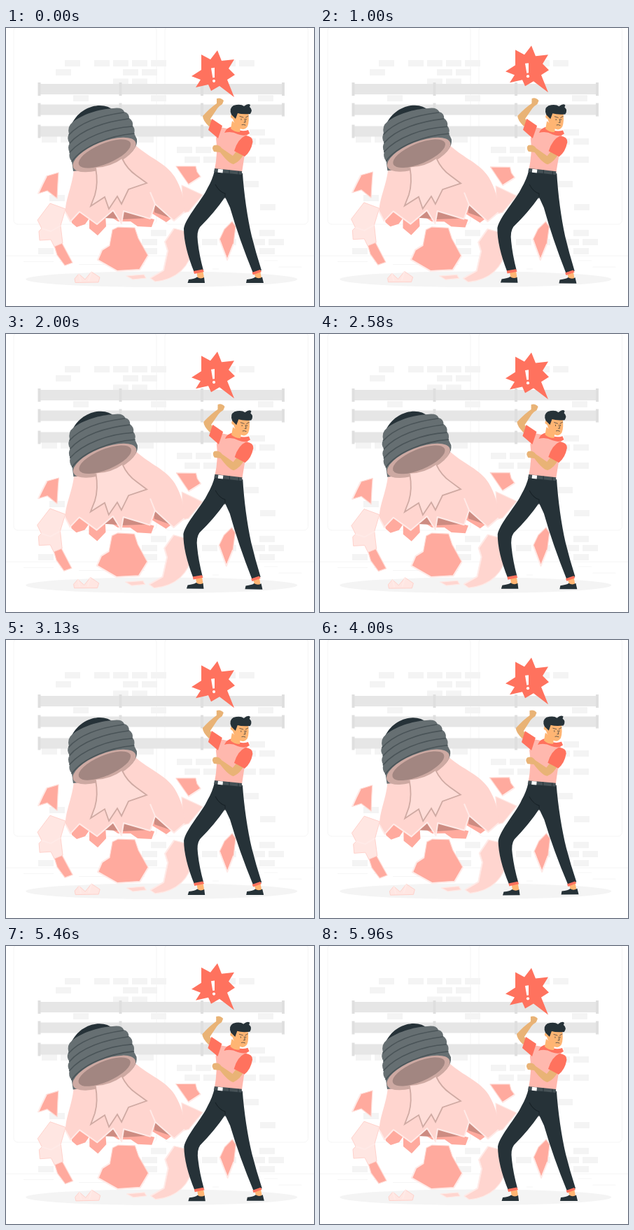
Animation, 440 px wide and 398 px high, one loop 6 s. Source, as an HTML page:

```html
<!DOCTYPE html>
<html lang="en">
<head>
<meta charset="utf-8">
<title>Broken bulb</title>
<style>
html, body { margin: 0; width: 100%; height: 100%; overflow: hidden; background: #fff; }
svg { display: block; width: 440px; height: 398px; }
.thin { fill: none; stroke: #ebebeb; stroke-width: .5; }
.mid { fill: #ffaa9e; }
.light { fill: #ffd5cf; }
.pale { fill: #ffe6e2; }
.edge { fill: none; stroke: #ffeae7; stroke-width: 2; stroke-linejoin: round; }
.mid, .light, .pale { stroke: #ffd9d3; stroke-width: 1.2; stroke-linejoin: round; }
.light { stroke: #ffe8e4; }
.pale { stroke: #ffcfc8; stroke-width: .9; }
.mid.bare, .light.bare { stroke: none; }
.shade { fill: #cd8c82; }
.dark { fill: #263238; }
.red { fill: #ff725e; }
.skin { fill: #e9b376; }
.face { fill: #ffb573; }
.thread { fill: none; stroke: #4a5458; stroke-width: 1.6; stroke-linecap: round; }
.line { fill: none; stroke: #263238; stroke-width: .7; stroke-linecap: round; }
</style>
</head>
<body>
<svg viewBox="0 0 440 398">
  <g class="thin">
    <rect x="11" y="-2" width="204" height="283" rx="5.7"/>
    <rect x="227" y="-2" width="204.5" height="283" rx="5.7"/>
    <path d="M0 326.2H440M389.5 342.2h33M295 345h9M369 333h19M25 334.4h43M77 334.4h6M104 338.6h94"/>
  </g>
  <g id="bricks" fill="#f4f4f4"></g>
  <g id="pipes"></g>
  <ellipse cx="222.3" cy="359.8" rx="194" ry="11.3" fill="#f4f4f4"/>

  <g id="bulb">
    <!-- loose shards -->
    <path class="mid" d="M75 207L58 212 52 224 46 237 59 233 73 244 74 222Z"/>
    <path class="edge" d="M58 212L52 224 46 237"/>
    <path class="mid" d="M69 312L80 308 95 336 84 340 73 325Z"/>
    <path class="pale" d="M63 251L85 259 78 283 81 308 69 313 64 303 48 304 47 291 51 287 45 275Z"/>
    <path class="edge" d="M51 287L64 291 78 283"/>
    <path class="mid" d="M243 198L271 198 273 206 278 213 261 224 254 214Z"/>
    <path class="edge" d="M278 213L261 224"/>
    <path class="light" d="M251 225L281 239 261 263 253 265Z"/>

    <!-- inside of the glass -->
    <path class="mid bare" d="M92 268L105 262 120 271 113 281 101 285 94 279ZM119 271L142 267 143 284 131 297 119 287Z"/>
    <path class="mid bare" d="M146 268L166 272 200 271 212 274 208 285 188 284 178 277 160 277ZM203 262L217 257 237 272 229 278Z"/>
    <path class="shade" d="M140 272L153 261 160 273ZM165 262L170 262 203 272 165 274ZM212 251L238 273 212 264Z"/>

    <path class="mid" d="M152 289L160 285 184 286 189 301 203 326 191 346 159 348 131 332 137 318 148 311Z"/>
    <path class="edge" d="M148 311L137 318 131 332 159 348 191 346 203 326"/>
    <path class="light" d="M240 287L256 291 266 316C263 340 245 360 213 363L206 358 225 347 231 319 227 306Z"/>
    <path class="edge" d="M240 287L227 306 231 319 225 347 206 358"/>
    <path class="pale" d="M98 359L104 352 113 360 122 349 134 357 132 364 99 364.500Z"/>
    <path class="edge" d="M104 352L107 363M122 349L118 362"/>
    <path class="light" d="M172 355L197 353 200 358 181 360Z"/>

    <!-- bulb glass -->
    <path class="light bare" d="M97 200C96 224 84 246 85 264L92 277 105 263 130 281 153 261 165 280 168 262 206 273 213 252 240 276 255 263C255 244 250 228 241 213C228 193 205 186 185 168Z"/>
    <path class="edge" d="M85 264L92 277 105 263 130 281 153 261 165 280 168 262 206 273 213 252 240 276 255 263M206 235L213 252"/>

    <!-- screw cap -->
    <path class="dark" d="M94 137C103 119 120 111 134 111Q147 111 153 118L130 138Z"/>
    <path d="M95 135C108 124 133 116 153 115Q166 113 169 120Q176 122 176 129Q182 133 181 140Q185 145 183 151L187 159C190 178 160 199 96 205L94 191Q89 186 91 178Q87 171 91 165Q86 158 90 152Q87 141 95 135Z" fill="#666f72"/>
    <g class="thread">
      <path d="M90 153C107 134 138 125 168 121"/>
      <path d="M91 165C108 145 142 134 175 130"/>
      <path d="M91 178C109 157 147 143 180 141"/>
      <path d="M94 191C110 169 148 154 183 151"/>
    </g>
    <ellipse cx="140.500" cy="181.500" rx="48" ry="18.500" transform="rotate(-22 140.500 181.500)" fill="#cda9a2"/>
    <ellipse cx="141" cy="180" rx="40" ry="14.500" transform="rotate(-23 141 180)" fill="#a28681"/>

    <!-- glass stem -->
    <path d="M128 200Q132 222 127 239L121 255 141 242 147 259 159 241 165 252 175 231 201 222 186 211Q173 202 166 187Q150 199 128 200Z" fill="#ffddd8"/>
    <path d="M128 200Q132 222 127 239L121 255 141 242 147 259 159 241 165 252 175 231 201 222 186 211Q173 202 166 187" fill="none" stroke="#cfaaa3" stroke-width="1.800"/>
  </g>

  <g id="man">
    <path class="mid" d="M323 277L312 288 305 303 316 332 325 309 328 284Z"/>
    <path class="edge" d="M305 303L316 332 325 309"/>

    <!-- legs -->
    <path class="face" d="M272 347L281 346 283 358 274 360ZM354 349L363 347 365 358 357 360Z"/>
    <path class="dark" d="M261 360Q270 359 273 356.500Q278 360 283 357L284 365H259.500ZM344 360Q353 359 356 356.500Q361 360 366 356.500L368 365H343Z"/>
    <path class="dark" d="M298 204L338 208C340 238 345 272 351 298Q357 322 365 347L353 351Q333 302 320 257L313 242Q298 264 277 285Q272 292 274 306Q276 325 282 347L269 350Q254 313 254 287C257 271 281 245 288 229Q295 217 298 204Z"/>
    <path d="M299 224Q305 235 313 237L313 244" fill="none" stroke="#172126"/>
    <path class="red" d="M268 348L281 345.500 283 349 269 352ZM351.500 350L363 346 365 349 353 353.500Z"/>

    <!-- body -->
    <path d="M306 142Q325 145 344 151Q349 165 341 181L337 207 298 203Q303 178 300 158Z" fill="#ffb8ae"/>
    <path d="M298 201L337 205V210L297 206Z" fill="#455156"/>
    <path d="M303 201.800L310 202.500 309.500 207.500 302.500 206.800Z" fill="#fff"/>
    <path d="M319 203.500V208.500M332 205V210" stroke="#263238"/>
    <path class="skin" d="M301 101Q307 99 311 104L309 109Q304 112 302 115L292 130 296 136 290 141Q281 132 281 126Q292 114 301 108Z"/>
    <path class="red" d="M294 130L309 140 303 158 289 146Z"/>
    <path class="skin" d="M341 178Q335 191 325 195Q318 194 306 178L297 177Q293 171 297 168Q304 166 308 172L324 183 331 174Z"/>
    <path class="red" d="M342 154Q353 155 352.500 163Q350 177 341 184L326 176Q331 159 342 154Z"/>
    <path class="red" d="M312 150Q315 142 324 141Q334 150 346 146L348 151Q342 156 331 152Q322 147 312 150Z"/>
    <path class="face" d="M323 133L335 142 334 149Q326 149 321 144Z"/>

    <!-- head -->
    <path class="face" d="M326 119L346 119Q348 134 345 141Q340 148 333 143Q326 138 324 130Q319 128 322 124Q325 122 326 126Z"/>
    <path class="dark" d="M322 124Q318 115 325 111Q335 108 340 112Q346 107 349 110L348 113Q353 117 349 123Q337 124 331 122L328 130 324 126Z"/>
    <path class="line" d="M334 126.500L339 128M342.500 128L346 126M336 130V131.500M343 130V131.500M341 130L342 135H340M337 138.500Q339 137.500 342 139"/>
  </g>

  <g id="alert">
    <path class="red" d="M279 38L292 45 302 32 308 47 326 45 318 58 327 67 316 74 326 99 305 83 293 90 289 81 271 85 278 74 265 69 279 60Z"/>
    <path d="M293 57.500L298 56.800 298 71 295.300 71.300Z" fill="#fff"/>
    <circle cx="297" cy="75.800" r="2.100" fill="#fff"/>
  </g>
</svg>
<script>
const $ = id => document.getElementById(id);
const rect = (x, y, w, h, fill) =>
  `<rect x="${x}" y="${y}" width="${w}" height="${h}"${fill ? ` fill="${fill}"` : ''}/>`;

// Each row: y, then the left end of every brick
const rows = [
  [46, 84, 126, 153, 180, 207, 306, 333], [59, 71, 167, 194], [72.5, 153, 180],
  [96, 96, 207, 360], [145, 348], [155, 51, 78, 162, 189], [158, 335, 362],
  [170, 244, 271], [184, 255, 282, 335, 362], [219, 339], [239, 62],
  [252, 363], [289, 207, 362], [302, 194, 280, 307, 348, 375],
  [315, 46, 194, 362]
];
$('bricks').innerHTML = rows.map(([y, ...xs]) => xs.map(x => rect(x, y, 22, 9)).join('')).join('');

const pipe = (y, end) => rect(46, y, end - 46, 15, '#e6e6e6') +
  [45.5, 161.5, 278, 394].filter(x => x < end).map(x => rect(x, y - 2, 4, 19, '#dfdfdf')).join('');
$('pipes').innerHTML = pipe(80, 397) + pipe(109.5, 397) + pipe(140.5, 300);

// Triangle wave: 0 at the start, 1 at half a period
const tri = (t, period) => 1 - Math.abs(1 - 2 * (t % period) / period);
const move = (id, transform) => $(id).setAttribute('transform', transform);

function draw(now) {
  const t = now % 6000;
  const sway = 2 * tri(t + 1500, 6000) - 1;
  move('bulb', `rotate(${sway} 163 238)`);
  move('man', `rotate(${sway} 310 233)`);
  move('alert', `translate(0 ${-10 * tri(t, 1500)})`);
  requestAnimationFrame(draw);
}
draw(0);
</script>
</body>
</html>
```
